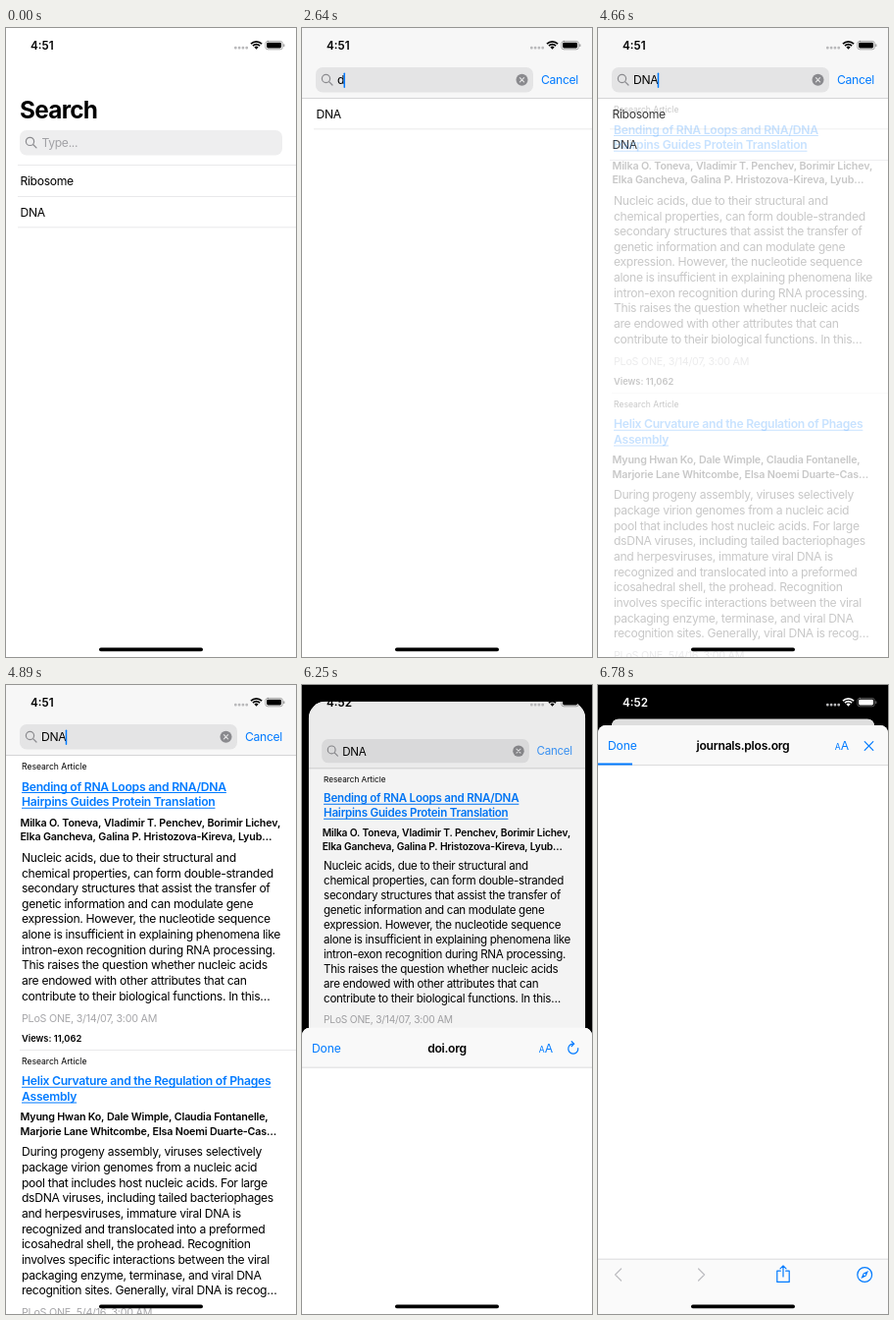
Recreate the animation shown at these times as an HTML page with a canvas. Size 296 by 640 pixels, loop 8 s.

```html
<!DOCTYPE html>
<html lang="en">
<head>
<meta charset="utf-8">
<title>Article search</title>
<style>
html, body { margin: 0; width: 100%; height: 100%; overflow: hidden; background: #fff; }
canvas { display: block; width: 296px; height: 640px; }
</style>
</head>
<body>
<canvas id="stage"></canvas>
<script>
const W = 296, H = 640, LOOP = 8000;
const BLUE = '#007aff', GREY = '#8a8a8e', LINE = '#e2e2e4', BAR = '#f7f7f7';
const canvas = document.getElementById('stage');
const ctx = canvas.getContext('2d');
const dpr = window.devicePixelRatio || 1;
canvas.width = W * dpr;
canvas.height = H * dpr;

// Type styles: weight, size, letter spacing
const BODY = [400, 12.15, -0.32];
const HEAD = [600, 12.15, -0.26];
const AUTHOR = [600, 10.73, -0.17];
const META = [400, 10.73, -0.24];
const SMALL = [400, 8.58, 0];
const VIEWS = [600, 9.3, 0];
const LARGE = [700, 24.3, -0.7];
const CLOCK = [600, 11.7, 0];

const ARTICLES = [{
  title: ['Bending of RNA Loops and RNA/DNA', 'Hairpins Guides Protein Translation'],
  authors: ['Milka O. Toneva, Vladimir T. Penchev, Borimir Lichev,',
    'Elka Gancheva, Galina P. Hristozova-Kireva, Lyub…'],
  text: ['Nucleic acids, due to their structural and',
    'chemical properties, can form double-stranded',
    'secondary structures that assist the transfer of',
    'genetic information and can modulate gene',
    'expression. However, the nucleotide sequence',
    'alone is insufficient in explaining phenomena like',
    'intron-exon recognition during RNA processing.',
    'This raises the question whether nucleic acids',
    'are endowed with other attributes that can',
    'contribute to their biological functions. In this…'],
  date: 'PLoS ONE, 3/14/07, 3:00 AM',
  views: 'Views: 11,062'
}, {
  title: ['Helix Curvature and the Regulation of Phages', 'Assembly'],
  authors: ['Myung Hwan Ko, Dale Wimple, Claudia Fontanelle,',
    'Marjorie Lane Whitcombe, Elsa Noemi Duarte-Cas…'],
  text: ['During progeny assembly, viruses selectively',
    'package virion genomes from a nucleic acid',
    'pool that includes host nucleic acids. For large',
    'dsDNA viruses, including tailed bacteriophages',
    'and herpesviruses, immature viral DNA is',
    'recognized and translocated into a preformed',
    'icosahedral shell, the prohead. Recognition',
    'involves specific interactions between the viral',
    'packaging enzyme, terminase, and viral DNA',
    'recognition sites. Generally, viral DNA is recog…'],
  date: 'PLoS ONE, 5/4/16, 3:00 AM'
}];

// Held values: [start time, value]
const CARET = [[0, 0], [500, 1], [740, .5], [860, 0], [1400, .8], [1520, 1], [1760, .5], [1880, 0],
  [2320, 1], [2960, .5], [3200, 1], [4070, .5], [4310, 1], [5110, .5], [5220, 0],
  [5460, .3], [5580, .7], [5690, 1], [6130, 0]];
const QUERY = [[0, ''], [2320, 'd'], [3310, ''], [4310, 'DNA']];
const FILTER = [[0, 0], [2430, .3], [2540, .75], [2640, 1], [3420, .85], [3530, .5], [3640, .15], [3750, 0]];
const RESULTS = [[0, 0], [4430, .02], [4540, .08], [4660, .22], [4770, .75], [4890, 1]];
const SHEET_TIMES = [6130, 6250, 6360, 6470, 6580, 6690, 6780];

function hold(track, t) {
  let value = track[0][1];
  for (const [start, v] of track) if (t >= start) value = v;
  return value;
}

// Critically damped spring, held between redraws
function sheetProgress(t) {
  const step = SHEET_TIMES.filter(s => s <= t).pop();
  if (!step) return 0;
  if (step === 6780) return 1;
  const x = (step - 6100) * 0.0109;
  return 1 - (1 + x) * Math.exp(-x);
}

const mix = (a, b, k) => a + (b - a) * k;

function fade(alpha, draw) {
  if (alpha <= 0) return;
  ctx.save();
  ctx.globalAlpha *= alpha;
  draw();
  ctx.restore();
}

function rect(x, y, w, h, color, r = 0) {
  ctx.fillStyle = color;
  ctx.beginPath();
  ctx.roundRect(x, y, w, h, r);
  ctx.fill();
}

function stroke(color, width, path) {
  ctx.strokeStyle = color;
  ctx.lineWidth = width;
  ctx.lineCap = ctx.lineJoin = 'round';
  ctx.beginPath();
  path();
  ctx.stroke();
}

function poly(...pts) {
  pts.forEach(([x, y], i) => i ? ctx.lineTo(x, y) : ctx.moveTo(x, y));
}

function disc(x, y, r, color) {
  ctx.fillStyle = color;
  ctx.beginPath();
  ctx.arc(x, y, r, 0, 7);
  ctx.fill();
}

// Text whose capitals are centred on y; returns its width
function text(str, x, y, [weight, size, spacing], color = '#000', align = 'left') {
  ctx.font = `${weight} ${size}px Inter, sans-serif`;
  ctx.letterSpacing = spacing + 'px';
  ctx.textAlign = align;
  ctx.fillStyle = color;
  ctx.fillText(str, x, y + size * 0.36);
  return ctx.measureText(str).width;
}

function statusBar(clock, color) {
  text(clock, 25, 18, CLOCK, color);
  for (let i = 0; i < 4; i++) rect(233 + i * 3.8, 18.8, 2.6, 2.6, '#b9b9bb', 1);
  for (const r of [7.8, 5]) {
    ctx.lineCap = 'butt';
    ctx.strokeStyle = color;
    ctx.lineWidth = 1.7;
    ctx.beginPath();
    ctx.arc(255.5, 21.7, r, -Math.PI * .75, -Math.PI * .25);
    ctx.stroke();
  }
  ctx.fillStyle = color;
  ctx.beginPath();
  ctx.moveTo(255.5, 21.8);
  ctx.arc(255.5, 21.7, 3, -Math.PI * .75, -Math.PI * .25);
  ctx.fill();
  fade(.4, () => {
    stroke(color, .8, () => ctx.roundRect(264.8, 13.4, 17.6, 8.4, 2.4));
    rect(283.2, 16.2, 1.2, 2.8, color, .6);
  });
  rect(266.1, 14.7, 15, 5.8, color, 1.4);
}

function searchField(y, width, color, query, caret) {
  rect(14, y - 12.8, width, 25.6, color, 7);
  stroke(GREY, 1.2, () => {
    ctx.arc(24.5, y - 1.3, 4.1, 0, 7);
    poly([27.6, y + 1.8], [31, y + 5.2]);
  });
  let end = 36;
  if (query) {
    end += text(query, 36, y + .3, BODY);
    disc(224.5, y, 6, GREY);
    stroke(color, 1.1, () => {
      poly([222.4, y - 2.1], [226.6, y + 2.1]);
      poly([226.6, y - 2.1], [222.4, y + 2.1]);
    });
  } else {
    text('Type...', 36.5, y + .3, BODY, '#a1a1a5');
  }
  fade(caret, () => rect(end - .6, y - 7.3, 1.5, 15.4, BLUE, .7));
}

function suggestions(top, filter) {
  const y = top + 15.9, shift = 31.5 * filter;
  fade(1 - filter, () => {
    text('Ribosome', 14.5, y, BODY);
    rect(12, top + 31, W - 12, .8, LINE);
  });
  text('DNA', 14.5, y + 31.5 - shift, BODY);
  rect(12, top + 62.5 - shift, W - 12, .8, LINE);
}

function article(a, y) {
  text('Research Article', 16, y + 83, SMALL);
  a.title.forEach((line, i) => {
    const ly = y + 103.3 + i * 15.7;
    const w = text(line, 16, ly, HEAD, BLUE);
    rect(16, ly + 5.8, w, 1, BLUE);
  });
  a.authors.forEach((line, i) => text(line, 14.5, y + 140 + i * 14.6, AUTHOR));
  a.text.forEach((line, i) => text(line, 16, y + 175.5 + i * 15.65, BODY));
  text(a.date, 16, y + 339, META, '#a6a6a9');
  if (a.views) text(a.views, 16, y + 360, VIEWS);
  rect(14, y + 371, W - 14, .8, LINE);
}

function results() {
  rect(0, 72, W, H - 72, '#fff');
  ARTICLES.forEach((a, i) => article(a, i * 299.6));
}

function searchScreen(t, covered = 0) {
  rect(0, 0, W, H, '#fff');
  if (t < 500) {
    text('Search', 14, 83.5, LARGE);
    searchField(116.7, 268, '#eeeeef', '', 0);
    rect(12, 139, W - 12, .8, LINE);
    suggestions(140, 0);
    return;
  }
  const shown = hold(RESULTS, t);
  if (shown < 1) suggestions(71.5, hold(FILTER, t));
  fade(shown, results);
  rect(0, 0, W, 71.2, BAR);
  rect(0, 71, W, .8, '#c8c8ca');
  searchField(52.8, 222, '#e4e4e5', hold(QUERY, t), hold(CARET, t));
  fade(1 - covered * .5, () => text('Cancel', 244, 52.5, [400, 12.15, -.3], BLUE));
}

function reloadIcon(x, y) {
  stroke(BLUE, 1.2, () => ctx.arc(x, y, 5, -.1, Math.PI * 1.55));
  stroke(BLUE, 1.2, () => poly([x - 1.6, y - 7.4], [x + .9, y - 5], [x - 1.6, y - 2.6]));
}

function closeIcon(x, y) {
  stroke(BLUE, 1.2, () => {
    poly([x - 4.3, y - 4.3], [x + 4.3, y + 4.3]);
    poly([x + 4.3, y - 4.3], [x - 4.3, y + 4.3]);
  });
}

function toolbar(y) {
  rect(0, y - 16, W, 60, '#fafafa');
  rect(0, y - 16.2, W, .8, '#d0d0d2');
  stroke('#bfbfc3', 1.3, () => {
    poly([23.6, y - 6], [17.6, y], [23.6, y + 6]);
    poly([102.6, y - 6], [108.6, y], [102.6, y + 6]);
  });
  stroke(BLUE, 1.2, () => {
    poly([186.3, y - 3.8], [182.8, y - 3.8], [182.8, y + 7.4], [195.2, y + 7.4], [195.2, y - 3.8], [191.7, y - 3.8]);
    poly([189, y + 2], [189, y - 9]);
    poly([186, y - 6.2], [189, y - 9.2], [192, y - 6.2]);
  });
  stroke(BLUE, 1.2, () => ctx.arc(272.2, y, 7.4, 0, 7));
  ctx.fillStyle = BLUE;
  ctx.beginPath();
  poly([276, y - 4], [273.6, y + 1.4], [268.4, y + 4], [270.8, y - 1.4]);
  ctx.fill();
  disc(272.2, y, 1, '#fafafa');
}

function browserSheet(top, loaded) {
  ctx.save();
  ctx.beginPath();
  ctx.roundRect(0, top, W, H, [8, 8, 0, 0]);
  ctx.clip();
  rect(0, top, W, H, '#fff');
  rect(0, top, W, 40.2, '#f9f9f9');
  rect(0, top + 40, W, .8, '#d0d0d2');
  const y = top + 20.8;
  text('Done', 10, y, [400, 12.15, -.15], BLUE);
  text(loaded ? 'journals.plos.org' : 'doi.org', W / 2, y, HEAD, '#000', 'center');
  text('A', 241.8, y + 1.2, [400, 8.6, 0], BLUE);
  text('A', 247.8, y, [400, 12.15, 0], BLUE);
  if (loaded) {
    closeIcon(276.5, y + .2);
    rect(0, top + 38.6, 35, 2, BLUE);
  } else {
    reloadIcon(276.8, y + .6);
  }
  toolbar(top + 559);
  ctx.restore();
}

function presented(t, p) {
  rect(0, 0, W, H, '#000');
  const scale = mix(1, 268 / 296, p), corner = mix(28, 8, p);
  ctx.save();
  ctx.translate(W * (1 - scale) / 2, 34.5 * p);
  ctx.scale(scale, scale);
  ctx.beginPath();
  ctx.roundRect(0, 0, W, H, [corner, corner, 0, 0]);
  ctx.clip();
  searchScreen(t, p);
  fade(.1 * p, () => rect(0, 0, W, H, '#000'));
  ctx.restore();
  browserSheet(mix(H, 41, p), t >= 6690);
}

function frame(now) {
  const t = now % LOOP, p = sheetProgress(t);
  ctx.setTransform(dpr, 0, 0, dpr, 0, 0);
  if (p > 0) presented(t, p);
  else searchScreen(t);
  statusBar(t < 6130 ? '4:51' : '4:52', p > .6 ? '#fff' : '#000');
  rect(95, 630.6, 106, 3.6, '#000', 1.8);
}

const start = performance.now();
function tick() {
  frame(performance.now() - start);
  requestAnimationFrame(tick);
}
tick();
</script>
</body>
</html>
```
